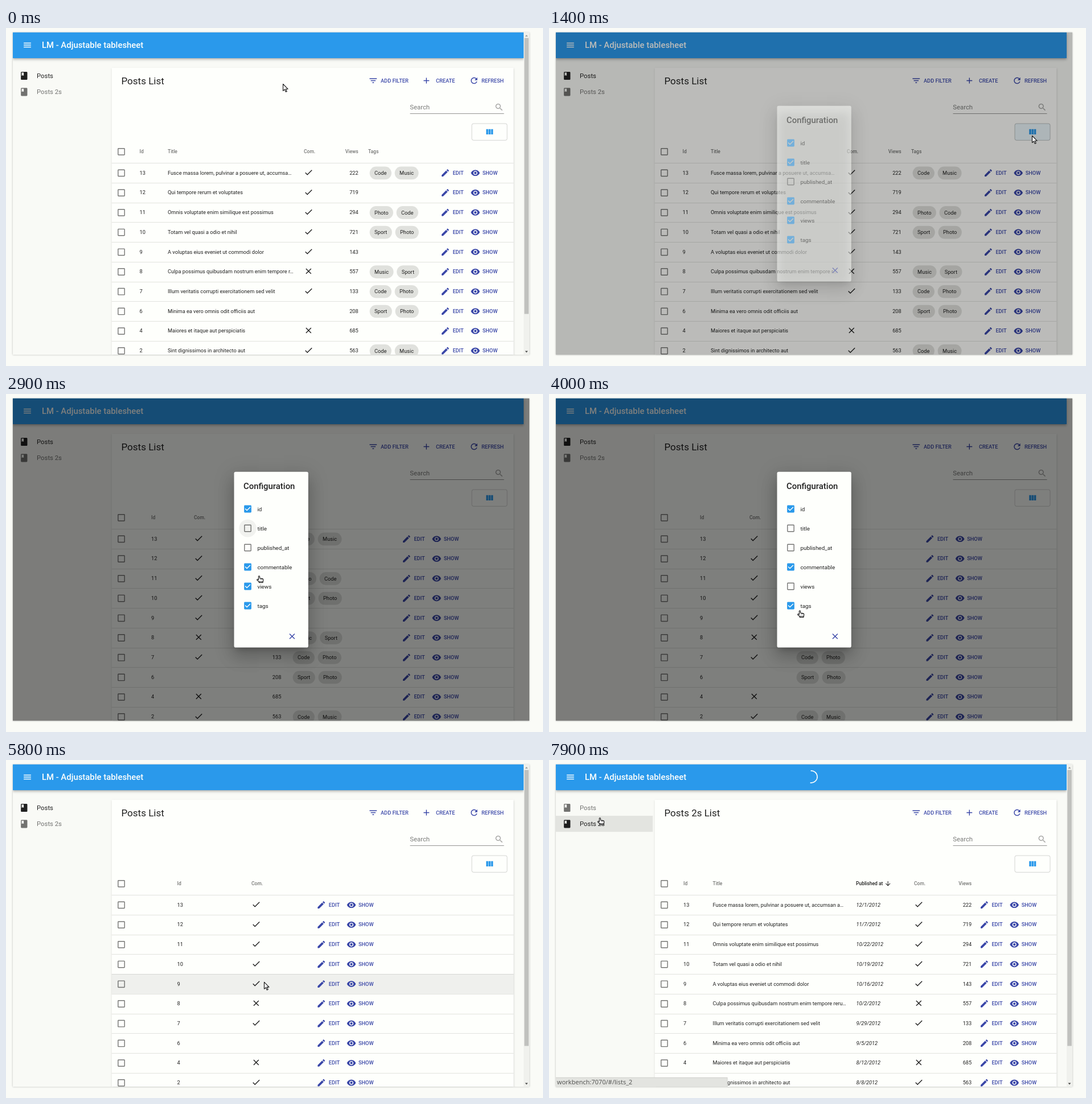
Write an HTML page with a canvas that moves like this. It is 943 px wide and 594 px high and loops after 8000 ms.

```html
<!DOCTYPE html>
<html lang="en">
<head>
<meta charset="utf-8">
<title>Customizable list</title>
<style>
html, body { margin: 0; width: 100%; height: 100%; overflow: hidden; background: #fafbf7; }
canvas { display: block; }
</style>
</head>
<body>
<canvas id="stage" width="943" height="594"></canvas>
<script>
const ctx = document.getElementById('stage').getContext('2d');
const LOOP = 8000, STEP = 100, S = 0.7086;
const WHITE = '#fefffc', PAGE = '#f9faf6', BLUE = '#2a99eb', INDIGO = '#3a47a8';
const DARK = 'rgba(0,0,0,.87)', GREY = 'rgba(0,0,0,.54)';
const WIN = { x: 12, y: 7.5, w: 907, h: 567 };
const ROW_TOP = 237.2, ROW_H = 34.72;

const paths = {
  menu: 'M3 18h18v-2H3v2zm0-5h18v-2H3v2zm0-7v2h18V6H3z',
  book: 'M18 2H6c-1.1 0-2 .9-2 2v16c0 1.1.9 2 2 2h12c1.1 0 2-.9 2-2V4c0-1.1-.9-2-2-2zM6 4h5v8l-2.5-1.5L6 12V4z',
  filter: 'M10 18h4v-2h-4v2zM3 6v2h18V6H3zm3 7h12v-2H6v2z',
  plus: 'M19 13h-6v6h-2v-6H5v-2h6V5h2v6h6v2z',
  refresh: 'M17.65 6.35C16.2 4.9 14.21 4 12 4c-4.42 0-7.99 3.58-7.99 8s3.57 8 7.99 8c3.73 0 6.84-2.55 7.73-6h-2.08c-.82 2.33-3.04 4-5.65 4-3.31 0-6-2.69-6-6s2.69-6 6-6c1.66 0 3.14.69 4.22 1.78L13 11h7V4l-2.35 2.35z',
  search: 'M15.5 14h-.79l-.28-.27C15.41 12.59 16 11.11 16 9.5 16 5.91 13.09 3 9.5 3S3 5.91 3 9.5 5.91 16 9.5 16c1.61 0 3.09-.59 4.23-1.57l.27.28v.79l5 4.99L20.49 19l-4.99-5zm-6 0C7.01 14 5 11.99 5 9.5S7.01 5 9.5 5 14 7.01 14 9.5 11.99 14 9.5 14z',
  columns: 'M10 18h5V5h-5v13zm-6 0h5V5H4v13zM16 5v13h5V5h-5z',
  box: 'M19 5v14H5V5h14m0-2H5c-1.1 0-2 .9-2 2v14c0 1.1.9 2 2 2h14c1.1 0 2-.9 2-2V5c0-1.1-.9-2-2-2z',
  boxOn: 'M19 3H5c-1.11 0-2 .9-2 2v14c0 1.1.89 2 2 2h14c1.11 0 2-.9 2-2V5c0-1.1-.89-2-2-2zm-9 14l-5-5 1.41-1.41L10 14.17l7.59-7.59L19 8l-9 9z',
  check: 'M9 16.17L4.83 12l-1.42 1.41L9 19 21 7l-1.41-1.41z',
  cross: 'M19 6.41L17.59 5 12 10.59 6.41 5 5 6.41 10.59 12 5 17.59 6.41 19 12 13.41 17.59 19 19 17.59 13.41 12z',
  edit: 'M3 17.25V21h3.75L17.81 9.94l-3.75-3.75L3 17.25zM20.71 7.04c.39-.39.39-1.02 0-1.41l-2.34-2.34c-.39-.39-1.02-.39-1.41 0l-1.83 1.83 3.75 3.75 1.83-1.83z',
  eye: 'M12 4.5C7 4.5 2.73 7.61 1 12c1.73 4.39 6 7.5 11 7.5s9.27-3.11 11-7.5c-1.73-4.39-6-7.5-11-7.5zM12 17c-2.76 0-5-2.24-5-5s2.24-5 5-5 5 2.24 5 5-2.24 5-5 5zm0-8c-1.66 0-3 1.34-3 3s1.34 3 3 3 3-1.34 3-3-1.34-3-3-3z',
  down: 'M20 12l-1.41-1.41L13 16.17V4h-2v12.17l-5.58-5.59L4 12l8 8 8-8z'
};
const icons = {};
for (const k in paths) icons[k] = new Path2D(paths[k]);
const arrowShape = new Path2D('M.5 .5V12.4L3.3 9.9L5.3 14.3L7.2 13.4L5.2 9.2H9Z');
const handShape = new Path2D('M3.4 1.4Q4.4 .2 5.5 1.4V4.8L10.6 5.6Q12 6 11.8 8L11 12.4H4.3V10.8L1 8.2Q.2 6.6 1.8 6.6L3.4 7.4Z');

// id | title ("|" marks where a narrow column cuts it) | commentable | views | tags | date
const rows = [
  [13, 'Fusce massa lorem, pulvinar a posuere ut, accumsa|n a', 'check', 222, 'Code Music', '12/1/2012'],
  [12, 'Qui tempore rerum et voluptates', 'check', 719, '', '11/7/2012'],
  [11, 'Omnis voluptate enim similique est possimus', 'check', 294, 'Photo Code', '10/22/2012'],
  [10, 'Totam vel quasi a odio et nihil', 'check', 721, 'Sport Photo', '10/19/2012'],
  [9, 'A voluptas eius eveniet ut commodi dolor', 'check', 143, '', '10/16/2012'],
  [8, 'Culpa possimus quibusdam nostrum enim tempore r|eru', 'cross', 557, 'Music Sport', '10/2/2012'],
  [7, 'Illum veritatis corrupti exercitationem sed velit', 'check', 133, 'Code Photo', '9/29/2012'],
  [6, 'Minima ea vero omnis odit officiis aut', '', 208, 'Sport Photo', '9/5/2012'],
  [4, 'Maiores et itaque aut perspiciatis', 'cross', 685, '', '8/12/2012'],
  [2, 'Sint dignissimos in architecto aut', 'check', 563, 'Code Music', '8/8/2012']
];

// Column positions; "views" is a right edge.
const layouts = [
  { from: 0, id: 234.5, title: 284, com: 523, views: 618.7, tags: 636, edit: 765 },
  { from: 2600, id: 255, com: 330, views: 483.3, tags: 501, edit: 697 },
  { from: 3500, id: 265, com: 352, tags: 432, edit: 662.5 },
  { from: 4300, id: 300.5, com: 431, edit: 547.3 },
  { from: 7300, id: 236, title: 287.5, pub: 539, com: 641, views: 742.2, edit: 758 }
];

// Cursor moves: start, end, x, y at the end
const moves = [
  [100, 1000, 848, 189], [1500, 1800, 495, 247], [1900, 2300, 428, 237],
  [2800, 2900, 440, 319], [3000, 3100, 437, 345], [3700, 4000, 436, 380],
  [4600, 5000, 497, 427], [5600, 6500, 148, 133], [6500, 6700, 119, 125], [6700, 7100, 85, 101]
];
const clicks = { title: 2500, views: 3400, tags: 4200 };
const options = ['id', 'title', 'published_at', 'commentable', 'views', 'tags'];

const clamp = v => Math.max(0, Math.min(1, v));
const smooth = v => { v = clamp(v); return v * v * (3 - 2 * v); };

function cursorAt(t) {
  let x = 486, y = 98;
  for (const [a, b, tx, ty] of moves) {
    const p = smooth((t - a) / (b - a));
    x += (tx - x) * p;
    y += (ty - y) * p;
  }
  return { x, y, hand: (t >= 1800 && t < 5300) || t >= 6600 };
}

function rect(x, y, w, h, fill) {
  ctx.fillStyle = fill;
  ctx.fillRect(x, y, w, h);
}

function round(x, y, w, h, r, fill, stroke) {
  ctx.beginPath();
  ctx.roundRect(x, y, w, h, r);
  if (fill) { ctx.fillStyle = fill; ctx.fill(); }
  if (stroke) { ctx.strokeStyle = stroke; ctx.lineWidth = 1; ctx.stroke(); }
}

function disc(x, y, r, fill) {
  ctx.beginPath();
  ctx.arc(x, y, r, 0, Math.PI * 2);
  ctx.fillStyle = fill;
  ctx.fill();
}

function text(s, x, cy, size, color = DARK, style = '400', align = 'left') {
  ctx.font = `${style} ${size * S}px Roboto, sans-serif`;
  ctx.fillStyle = color;
  ctx.textAlign = align;
  ctx.fillText(s, x, cy + size * S * 0.356);
}

function icon(name, cx, cy, color, size = 24) {
  const k = size / 24 * S;
  ctx.save();
  ctx.translate(cx - 12 * k, cy - 12 * k);
  ctx.scale(k, k);
  ctx.fillStyle = color;
  ctx.fill(icons[name]);
  ctx.restore();
}

// Layers: [offset y, blur, spread, alpha]; only the shadow lands on the stage.
function shadow(x, y, w, h, layers) {
  for (const [dy, blur, spread, alpha] of layers) {
    const g = spread * S;
    ctx.save();
    ctx.shadowColor = `rgba(0,0,0,${alpha})`;
    ctx.shadowBlur = blur * S;
    ctx.shadowOffsetX = 3000;
    ctx.shadowOffsetY = dy * S;
    rect(x - g - 3000, y - g, w + 2 * g, h + 2 * g, '#000');
    ctx.restore();
  }
}

function drawBar(t) {
  shadow(12, 7.5, 897, 45.5, [[2, 4, -1, .2], [4, 5, 0, .14], [1, 10, 0, .12]]);
  rect(12, 7.5, 897, 45.5, BLUE);
  icon('menu', 37.5, 30, WHITE);
  text('LM - Adjustable tablesheet', 63, 30, 21, WHITE, '500');
  if (t >= 7400) {
    const p = (t - 7400) / 500, rad = Math.PI / 180;
    const start = (105 + 160 * p) * rad;
    ctx.beginPath();
    ctx.arc(460.5, 29.5, 10.6, start, start + (60 + 135 * p) * rad);
    ctx.strokeStyle = WHITE;
    ctx.lineWidth = 1.6;
    ctx.stroke();
  }
}

function drawMenu(t) {
  const second = t >= 7300;
  if (t >= 6600) rect(12, 98, 170.3, 28.3, 'rgba(0,0,0,.04)');
  if (t >= 7200) {
    ctx.save();
    ctx.beginPath();
    ctx.rect(12, 98, 170.3, 28.3);
    ctx.clip();
    disc(89, 102, 20 + 100 * smooth((t - 7100) / 500), 'rgba(0,0,0,.05)');
    ctx.restore();
  }
  ['Posts', 'Posts 2s'].forEach((label, i) => {
    const color = (i === 1) === second ? DARK : GREY;
    icon('book', 31.8, 84 + 28.3 * i, color);
    text(label, 54, 83.6 + 28.3 * i, 16, color);
  });
}

function drawTools(t, cur) {
  text(t >= 7300 ? 'Posts 2s List' : 'Posts List', 202.5, 92.6, 24);
  [['filter', 644.8, 'ADD FILTER', 658], ['plus', 738.3, 'CREATE', 755], ['refresh', 822, 'REFRESH', 835]]
    .forEach(([name, ix, label, x]) => {
      icon(name, ix, 92.5, INDIGO);
      text(label, x, 92.6, 13, INDIGO, '500');
    });
  text('Search', 709.3, 139, 16, 'rgba(0,0,0,.52)');
  icon('search', 866, 139.3, 'rgba(0,0,0,.36)');
  rect(709.5, 150, 165, 1, 'rgba(0,0,0,.42)');

  const over = cur.x >= 818 && cur.y >= 168 && cur.x < 880 && cur.y < 197 && t < 1500;
  const tint = over ? 1 : t >= 1500 && t < 1800 ? 1 - (t - 1400) / 400 : 0;
  round(818, 168, 62, 29.3, 3, `rgba(33,150,243,${.08 * tint})`, `rgba(0,0,0,${.17 + .07 * tint})`);
  icon('columns', 848.9, 182.8, BLUE);
}

function drawRow(row, k, L, hover) {
  const [id, title, com, views, tags, date] = row;
  const top = ROW_TOP + ROW_H * k, cy = top + 17.2;
  if (hover) rect(185.5, top, 706, ROW_H, 'rgba(0,0,0,.06)');
  icon('box', 202.5, cy + .5, GREY);
  text(id, L.id, cy, 13);
  if (L.title) {
    const [head, tail] = title.split('|');
    text(tail ? head + (L.pub ? tail : '') + '…' : head, L.title, cy, 13);
  }
  if (L.pub) text(date, L.pub + .5, cy, 13, DARK, 'italic 400');
  if (com) icon(com, L.com + 8.3, cy - .6, DARK);
  if (L.views) text(views, L.views, cy, 13, DARK, '400', 'right');
  if (L.tags && tags) {
    let x = L.tags + 2.6;
    for (const tag of tags.split(' ')) {
      ctx.font = `400 ${13 * S}px Roboto, sans-serif`;
      const w = ctx.measureText(tag).width + 17;
      round(x, cy - 10.8, w, 22.7, 11.35, '#e0e1dd');
      text(tag, x + 8.5, cy + .5, 13);
      x += w + 5.7;
    }
  }
  icon('edit', L.edit + 6.4, cy + .3, INDIGO);
  text('EDIT', L.edit + 19.4, cy, 13, INDIGO, '500');
  icon('eye', L.edit + 59.2, cy + .3, INDIGO);
  text('SHOW', L.edit + 71.7, cy, 13, INDIGO, '500');
  rect(185.5, Math.round(top + ROW_H), 706, 1, '#e2e3df');
}

function drawTable(t, cur) {
  const L = layouts.filter(l => t >= l.from).pop();
  const head = (s, x, align) => x && text(s, x, 217.3, 12, GREY, '500', align);
  icon('box', 202.5, 217.4, GREY);
  head('Id', L.id);
  head('Title', L.title);
  head('Com.', L.com);
  head('Views', L.views, 'right');
  head('Tags', L.tags);
  if (L.pub) {
    text('Published at', L.pub, 217.3, 12, DARK, '500');
    icon('down', 595.2, 217.3, DARK, 18);
  }
  rect(185.5, 237, 706, 1, '#e2e3df');
  const live = t >= 5300 && t < 6600 && cur.x > 185.5;
  const over = live ? Math.floor((cur.y - ROW_TOP) / ROW_H) : -1;
  rows.forEach((row, k) => drawRow(row, k, L, k === over));
}

function triangle(x, y, d, fill) {
  ctx.beginPath();
  ctx.moveTo(x - 2.5, y - d);
  ctx.lineTo(x + 2.5, y - d);
  ctx.lineTo(x, y + d);
  ctx.fillStyle = fill;
  ctx.fill();
}

function drawScrollbar() {
  rect(909, 7.5, 10, 567, '#f0f1ed');
  rect(910.3, 17.5, 7.6, 485, '#c0c1be');
  triangle(914, 13.5, -1.4, '#9d9e9b');
  triangle(914, 569, 1.4, '#4c4d4b');
}

function drawStatus() {
  rect(12, 557.7, 301.5, 17, '#c9cac6');
  rect(12, 558.5, 300.7, 16.2, '#e3e4e0');
  ctx.font = '400 11px "Noto Sans", sans-serif';
  ctx.fillStyle = '#565755';
  ctx.textAlign = 'left';
  ctx.fillText('workbench:7070/#/lists_2', 14, 570.3);
}

function drawRipple(t, at, cy) {
  const age = t - at;
  if (age < 0 || age >= 600) return;
  const fade = age < 300 ? 1 : 1 - (age - 200) / 400;
  const tint = age < 100 ? '33,150,243' : '0,0,0';
  disc(424.5, cy, 9 + 6.4 * clamp(age / 200), `rgba(${tint},${.1 * fade})`);
}

function drawDialog(t, open) {
  ctx.globalAlpha = open;
  rect(WIN.x, WIN.y, WIN.w, WIN.h, 'rgba(0,0,0,.5)');
  const x = 400.5, y = 136.8, w = 130.3, h = 308.7;
  shadow(x, y, w, h, [[11, 15, -7, .2], [24, 38, 3, .14], [9, 46, 8, .12]]);
  round(x, y, w, h, 2.8, WHITE);
  text('Configuration', 417, 162.2, 21, DARK, '500');
  options.forEach((name, i) => {
    const cy = 202 + 34 * i, at = clicks[name];
    const on = name !== 'published_at' && !(at && t >= at + 100);
    if (at) drawRipple(t, at, cy);
    icon(on ? 'boxOn' : 'box', 424.5, cy, on ? BLUE : GREY);
    text(name, 441.4, cy, 14);
  });
  if (t >= 5200) round(480, 412, 45, 27.5, 2.8, 'rgba(63,81,181,.1)');
  icon('cross', 502.4, 425.9, INDIGO);
  ctx.globalAlpha = 1;
}

function drawCursor({ x, y, hand }) {
  const shape = hand ? handShape : arrowShape;
  ctx.save();
  ctx.translate(x, y);
  ctx.fillStyle = '#fff';
  ctx.strokeStyle = '#111';
  ctx.lineWidth = 1.1;
  ctx.lineJoin = 'round';
  ctx.fill(shape);
  ctx.stroke(shape);
  if (hand) {
    ctx.beginPath();
    for (const fx of [7.3, 9.3]) {
      ctx.moveTo(fx, 5.4);
      ctx.lineTo(fx, 7.4);
    }
    ctx.moveTo(4.4, 10.6);
    ctx.lineTo(11.2, 10.6);
    ctx.lineWidth = .8;
    ctx.stroke();
  }
  ctx.restore();
}

function draw(t) {
  const cur = cursorAt(t);
  const open = t < 1300 || t >= 5300 ? 0 : smooth((t - 1280) / 230);
  rect(0, 0, 943, 594, '#fafbf7');
  shadow(WIN.x, WIN.y, WIN.w, WIN.h, [[1, 4, 0, .28]]);

  ctx.save();
  ctx.beginPath();
  ctx.rect(WIN.x, WIN.y, WIN.w, WIN.h);
  ctx.clip();
  rect(WIN.x, WIN.y, WIN.w, WIN.h, PAGE);
  drawMenu(t);
  shadow(185.5, 69.8, 706, 600, [[1, 5, 0, .2], [2, 2, 0, .14], [3, 1, -2, .12]]);
  rect(185.5, 69.8, 706, 600, WHITE);
  drawTools(t, cur);
  drawTable(t, cur);
  drawBar(t);
  if (t >= 7000) drawStatus();
  if (open) drawDialog(t, open);
  else drawScrollbar();
  ctx.restore();
  drawCursor(cur);
}

const begin = performance.now();
function tick() {
  const t = (performance.now() - begin) % LOOP;
  draw(Math.floor(t / STEP) * STEP);
  requestAnimationFrame(tick);
}
tick();
</script>
</body>
</html>
```
